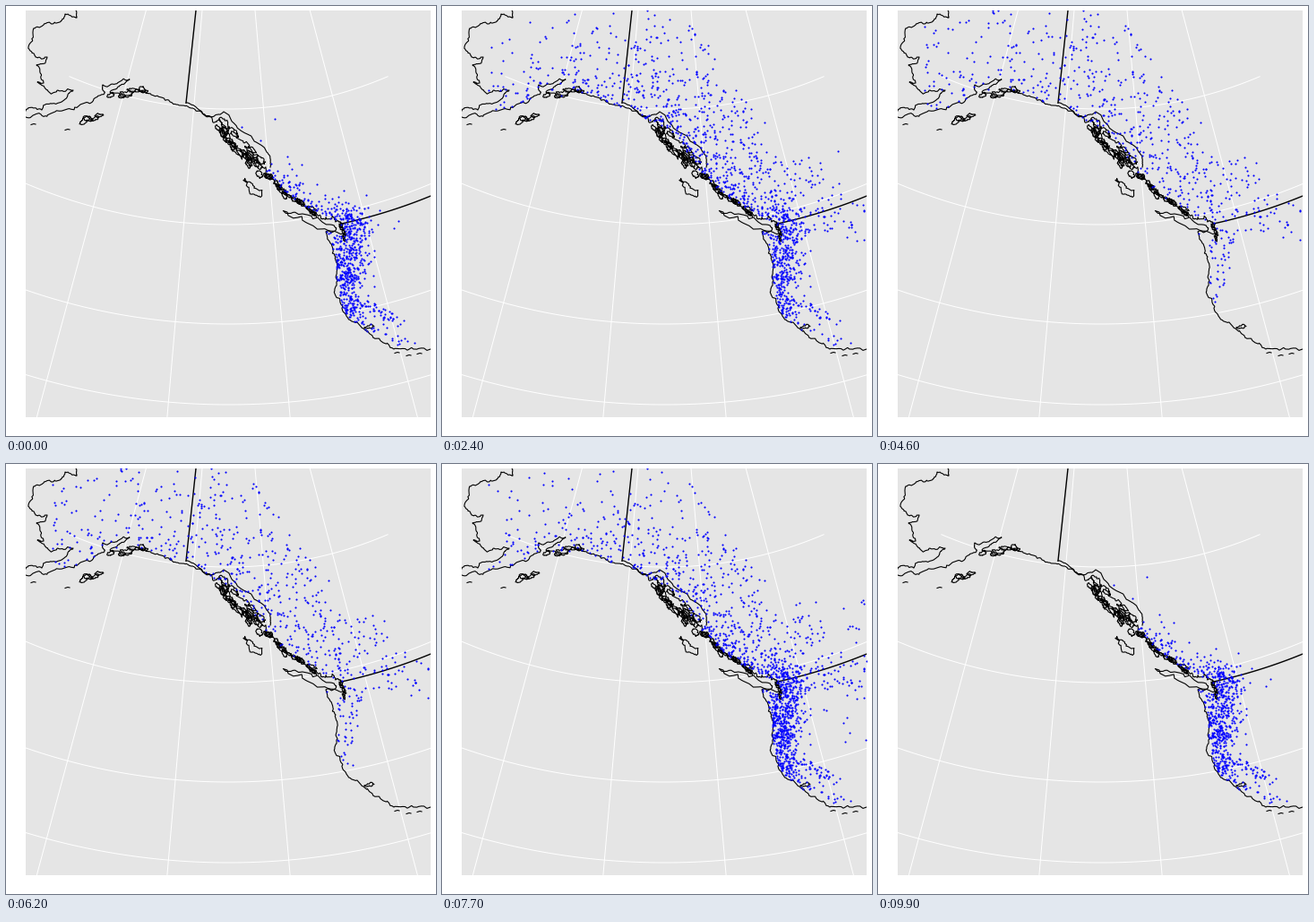
Recreate the animation shown at these times as a matplotlib script. Size 480 by 480 pixels, loop 10 s.

```python
import numpy as np
import matplotlib.pyplot as plt
from matplotlib.animation import FuncAnimation
from matplotlib.path import Path

FRAMES, STEP = 100, 100          # frames per loop, ms per frame
LOOP = FRAMES * STEP / 1000      # seconds
SPRING_END, AUTUMN_START = 4.1, 6.2
PX = 0.72                        # points per pixel at 100 dpi
LEFT, RIGHT, TOP, BOTTOM = 22, 474, 5, 459
POLE_X, POLE_Y = 248.5, -338     # where the meridians meet

rng = np.random.default_rng(12)

fig = plt.figure(figsize=(4.8, 4.8), dpi=100, facecolor="white")
ax = fig.add_axes([LEFT / 480, 1 - BOTTOM / 480,
                   (RIGHT - LEFT) / 480, (BOTTOM - TOP) / 480])
ax.set(xlim=(LEFT, RIGHT), ylim=(BOTTOM, TOP), xticks=[], yticks=[],
       facecolor="#e5e5e5")
ax.spines[:].set_visible(False)


# ---------- drawing helpers ----------

def along(points, k):
    """Places at fractions k of a polyline's length."""
    p = np.array(points, float)
    d = np.append(0, np.cumsum(np.hypot(*np.diff(p, axis=0).T)))
    return np.column_stack([np.interp(k * d[-1], d, c) for c in p.T])


def rough(points, jag=0.13, rounds=4):
    """Break a polyline into ever smaller jagged steps."""
    p = np.array(points, float)
    for _ in range(rounds):
        size = np.hypot(*np.diff(p, axis=0).T)[:, None]
        mid = (p[:-1] + p[1:]) / 2
        mid += rng.normal(0, 1, mid.shape) * np.minimum(1.7, size * jag)
        out = np.empty((2 * len(p) - 1, 2))
        out[::2], out[1::2] = p, mid
        p = out
    return p


def line(points, width=1.1, color="black", z=2):
    ax.plot(*np.transpose(points), color=color, lw=width * PX, zorder=z,
            solid_joinstyle="round")


def arc(radius, x0, x1, **style):
    x = np.linspace(x0, x1, 90)
    y = POLE_Y + np.sqrt(radius ** 2 - (x - POLE_X) ** 2)
    line(np.column_stack([x, y]), **style)


def island(x, y, length, width, tilt):
    """A ragged elongated island."""
    a = np.linspace(0, 2 * np.pi, 11)[:-1]
    r = rng.uniform(0.6, 1.25, a.size)
    u, v = length * r * np.cos(a), width * r * np.sin(a)
    c, s = np.cos(tilt), np.sin(tilt)
    ring = np.column_stack([x + u * c - v * s, y + u * s + v * c])
    line(rough(np.vstack([ring, ring[:1]]), 0.2, 2))


def archipelago(path, n, spread, length, tilt):
    for x, y in along(path, np.linspace(0, 1, n)):
        island(*rng.normal((x, y), spread), length * rng.uniform(0.5, 1.1),
               length * rng.uniform(0.2, 0.45), rng.normal(tilt, 0.25))


# ---------- base map ----------

for angle in np.radians([-15.04, -4.92, 4.92, 14.82]):
    y = np.array([TOP, BOTTOM])
    line(np.column_stack([POLE_X + (y - POLE_Y) * np.tan(angle), y]),
         1, "white", 1)
for radius in (453, 582, 693, 783):
    half = min(radius * np.sin(np.radians(23.07)), 230)
    arc(radius, POLE_X - half, POLE_X + half, width=1, color="white", z=1)

BAYS = [(78, 5), (79, 13), (66, 9), (60, 18), (33, 24), (25, 46), (33, 57),
        (46, 57), (34, 66), (42, 86), (35, 85), (48, 96), (75, 94), (66, 104),
        (40, 116), (22, 117)]
GULF = [(22, 124), (50, 120), (92, 108), (110, 97), (108, 88), (138, 82),
        (116, 96), (136, 102), (146, 93), (162, 99), (190, 110), (212, 117),
        (235, 129)]
FJORDS = [(235, 129), (258, 142), (290, 186), (314, 211), (345, 230),
          (372, 241)]
SHORE = [(372, 241), (380, 256), (357, 252), (368, 280), (369, 312),
         (377, 342), (400, 361), (433, 383), (474, 383)]
PANHANDLE = [(240, 134), (262, 160), (284, 178)]

for part in (BAYS, GULF, SHORE):
    line(rough(part))
line(rough(FJORDS, 0.3, 5))

archipelago([(118, 99), (158, 96)], 6, 2, 7, 0)
archipelago([(86, 128), (104, 123)], 4, 1.5, 7, -0.2)
archipelago(PANHANDLE, 26, 4, 8, 1)
archipelago(FJORDS[2:5], 20, 2, 5, 0.7)
archipelago([(374, 245), (378, 260)], 5, 1.5, 4, 1.2)
island(275, 203, 14, 4, 0.9)
island(344, 240, 33, 5, 0.32)
island(406, 358, 6, 2, -0.3)
for x, y in [(31, 132), (69, 138), (437, 387), (450, 390), (462, 388)]:
    line([(x - 3, y + 0.5), (x, y - 0.5), (x + 2, y)])

line([(212, 5), (201, 108)], 1.4)
line(rough([(201, 108), (229, 124), (243, 118), (291, 163), (295, 180)], 0.08))
arc(594.5, 372, RIGHT, width=1.4)


# ---------- sightings ----------

COAST = GULF + FJORDS[1:] + SHORE[1:]
LAND = Path(COAST + [(RIGHT, TOP)] + BAYS)
COAST_FINE = along(COAST, np.linspace(0, 1, 220))
SOUTH = [(374, 264), (380, 300), (381, 336), (390, 352)]


def near_coast(p, reach):
    gap = np.hypot(*(p[:, None] - COAST_FINE).transpose(2, 0, 1)).min(1)
    return np.exp(-gap / reach)


def in_summer_range(p):
    x, y = p.T
    north_edge = np.interp(x, [250, 290, 318, 360, 368, 420, 440, 474],
                           [5, 30, 80, 127, 163, 168, 203, 226])
    south_edge = np.interp(x, [368, 392, 402, 474], [345, 307, 250, 265])
    return (y > north_edge) & (y < south_edge) & (x > 48)


def summer_weight(p):
    west = np.where(p[:, 0] < 205, 0.55, 1)
    return in_summer_range(p) * west * (0.4 + 0.8 * near_coast(p, 30))


def passage_weight(p):
    return in_summer_range(p) * near_coast(p, 28)


def east_weight(p):
    x, y = p.T
    return (x > 390) & (y > 150) & (y < 200 + (x - 360) * 1.3)


def pick(n, weight):
    """Random places on land, favouring a high weight."""
    p = rng.uniform((LEFT, TOP), (RIGHT, 384), (16000, 2))
    p = p[LAND.contains_points(p)]
    w = weight(p).astype(float)
    return p[rng.choice(len(p), n, replace=False, p=w / w.sum())]


def band(path, n, spread):
    """Random places on land around a path."""
    p = along(path, rng.random(n * 4))
    p += rng.normal(0, spread, p.shape)
    return p[LAND.contains_points(p)][:n]


def northness(p):
    return (RIGHT - p[:, 0] + 400 - p[:, 1]) / 845


def stay(p, arrive, leave, jitter):
    """Places with the times they light up and go dark."""
    times = [t + rng.normal(0, jitter, len(p)) for t in (arrive, leave)]
    return p, *times


def spring(p, when):
    p, t0, t1 = stay(p, when - 0.5, when + 0.5, 0.3)
    t0 = np.clip(t0, 0.1, SPRING_END)
    return p, t0, np.clip(t1, t0, SPRING_END)


def autumn(p, when):
    p, t0, t1 = stay(p, when - 0.45, when + 0.45, 0.3)
    t0 = np.clip(t0, AUTUMN_START, 9.9)
    return p, t0, np.clip(t1, t0, 9.9)


def winter(p):
    p, t0, t1 = stay(p, 7.05, 2.55, 0.35)
    return p, np.clip(t0, AUTUMN_START, 9), np.clip(t1, 1, SPRING_END)


def summer(p):
    s = northness(p)
    p, t0, t1 = stay(p, 0.2 + 2.6 * s, 9.3 - 2.2 * s, 0.37)
    return p, np.clip(t0, 0.1, SPRING_END), np.clip(t1, AUTUMN_START, 9.9)


passing = pick(460, passage_weight)
returning = pick(360, passage_weight)
groups = [
    winter(band(SOUTH, 310, 8)),
    winter(band([(342, 236), (375, 243), (395, 246)], 150, 10)),
    winter(band([(394, 238), (391, 300)], 105, 9)),
    winter(band([(290, 185), (338, 226)], 50, 8)),
    winter(band([(402, 333), (440, 356)], 42, 3.5)),
    winter(band([(386, 350), (450, 378)], 24, 4)),
    winter(band([(260, 130), (330, 195), (425, 245)], 20, 14)),
    summer(pick(680, summer_weight)),
    spring(passing, 0.9 + 2.6 * northness(passing)),
    spring(pick(40, east_weight), 1.6),
    spring(band(SOUTH, 110, 8), 1.6),
    autumn(returning, 8.9 - 2 * northness(returning)),
    autumn(pick(55, east_weight), 7.8),
    autumn(band(SOUTH, 110, 8), 8.1),
]
places, start, end = (np.concatenate(part) for part in zip(*groups))
length = (end - start) % LOOP

# some summer sites blink while the rest keep still: 1 goes dark, 2 lights up
blink = rng.choice([0, 1, 2], len(places), p=[0.88, 0.06, 0.06])
PULSES = {43, 46, *range(50, 63, 3)}

dots = ax.scatter([], [], s=(2.1 * PX) ** 2, c="blue", marker="o",
                  linewidths=0, antialiased=False, zorder=3)


def draw(i):
    t = i * STEP / 1000 + 1e-6
    shown = (t - start) % LOOP < length
    if SPRING_END <= t < AUTUMN_START + STEP / 1000:
        shown &= blink != (1 if i in PULSES else 2)
    dots.set_offsets(places[shown])
    return [dots]


anim = FuncAnimation(fig, draw, frames=FRAMES, interval=STEP, repeat=True,
                     repeat_delay=0, blit=False)
plt.show()
```
